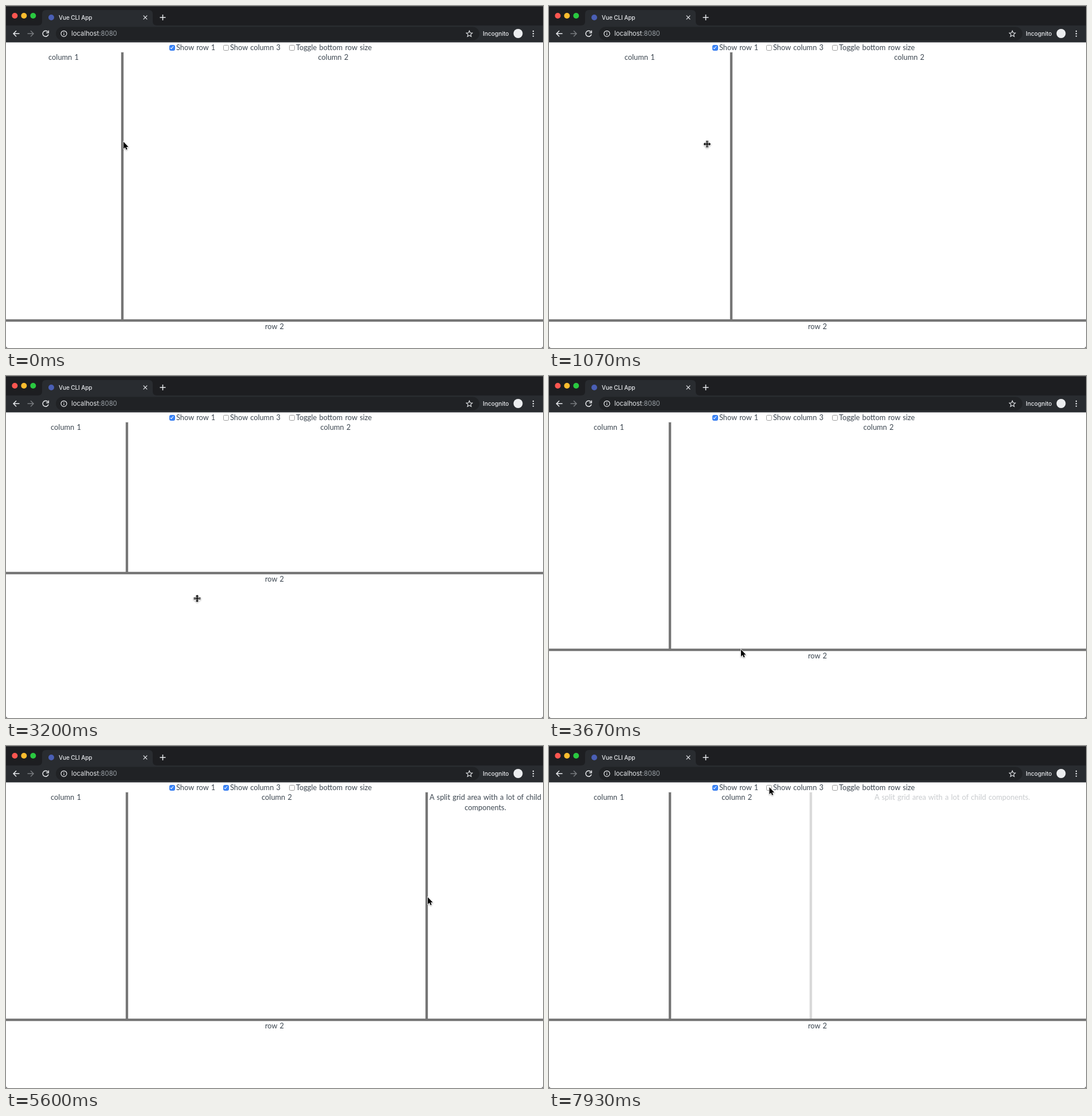
Write an HTML page that moves like this. It is 937 by 597 pixels and loops after 8 s.

```html
<!DOCTYPE html>
<html lang="en">
<head>
<meta charset="utf-8">
<title>Split grid demo</title>
<style>
html, body { margin: 0; width: 100%; height: 100%; overflow: hidden; background: #555; }
#page {
  position: absolute; inset: 0; overflow: hidden; background: #fff; border-radius: 0 0 4px 4px;
  font: 12.8px/17.6px Lato, sans-serif; word-spacing: 1px; color: #3c4650;
  -webkit-font-smoothing: antialiased;
}
#page > *, svg { position: absolute; }
.pane { text-align: center; top: 81px; }
.bar { background: #767676; box-shadow: 0 0 0 1px #76767626; }
.v { width: 4px; top: 81px; }
label { top: 63.5px; white-space: nowrap; }
.box {
  width: 10px; height: 10px; top: 68px; box-sizing: border-box;
  border: 1px solid #9c9c9c; border-radius: 2.5px; background: #fff;
}
.box.on { border-color: #3078ee; background: #3b84f7; }
.box.on::after {
  content: ""; position: absolute; left: 2.4px; top: .2px; width: 2px; height: 4.6px;
  border: solid #fff; border-width: 0 1.4px 1.4px 0; transform: rotate(40deg);
}
svg { left: 0; top: 0; }
svg text { font-family: Inter, sans-serif; }
</style>
</head>
<body>
<div id="page">
  <div class="box on" style="left:285px"></div><label style="left:297px">Show row 1</label>
  <div class="box" id="check" style="left:379px"></div><label style="left:391px">Show column 3</label>
  <div class="box" style="left:494px"></div><label style="left:506px">Toggle bottom row size</label>
  <div class="pane" id="col1" style="left:0">column 1</div>
  <div class="bar v" id="bar1"></div>
  <div class="pane" id="col2">column 2</div>
  <div class="bar v" id="bar2"></div>
  <div class="pane" id="col3">A split grid area with a lot of child components.</div>
  <div class="bar" id="rowBar" style="left:0;width:937px;height:4px"></div>
  <div class="pane" id="row2" style="left:0;width:937px">row 2</div>
</div>
<svg width="937" height="597" fill="none">
  <path fill="#1d1e21" d="M0 0H937V34H0z"/>
  <path fill="#4b4c4e" d="M0 0H937V1H0z"/>
  <path fill="#292c30" d="M0 34H56Q63 34 63 27V14Q63 7 70 7H249Q256 7 256 14V27Q256 34 263 34H937V63.5H0z"/>
  <rect x="87" y="36.5" width="739" height="23.5" rx="11.7" fill="#202225"/>
  <circle cx="15.3" cy="17" r="5" fill="#fc5650"/>
  <circle cx="31.3" cy="17" r="5" fill="#fdbc2e"/>
  <circle cx="47.3" cy="17" r="5" fill="#2ac840"/>
  <circle cx="79" cy="20" r="5" fill="#4a5fb4"/>
  <circle cx="893.5" cy="48" r="8" fill="#eceef0"/>
  <g stroke="#e8eaed" stroke-width="1.5">
    <path stroke-width="1.2" d="M239.7 16.7l6.6 6.6m0-6.6l-6.6 6.6"/>
    <path d="M268.5 20h10m-5-5v10"/>
    <path d="M23.5 48.3H13m5-5l-5 5l5 5"/>
    <path stroke="#777a7e" d="M37.5 48.3H48m-5-5l5 5l-5 5"/>
    <path d="M73 45A5 5 0 1 0 74 49.5M74.3 42.7V46.7H70.3"/>
    <circle cx="101" cy="48.3" r="5" stroke-width="1.2"/>
    <path stroke-width="1.2" d="M101 47.5v3.5m0-6v1.3"/>
    <path stroke-width="1.1" d="M808.5 43.2l1.5 3.5l3.8.4l-2.9 2.5l.9 3.7l-3.3-2l-3.3 2l.9-3.7l-2.9-2.5l3.8-.4z"/>
  </g>
  <g fill="#e8eaed">
    <circle cx="920" cy="44" r="1.2"/><circle cx="920" cy="48.3" r="1.2"/><circle cx="920" cy="52.6" r="1.2"/>
    <text x="92" y="23.6" font-size="10" font-weight="500" letter-spacing="-.1">Vue CLI App</text>
    <text x="114" y="52.3" font-size="11.3">localhost<tspan fill="#9aa0a6">:8080</tspan></text>
    <text x="832" y="52" font-size="10.2" font-weight="500">Incognito</text>
  </g>
  <g id="pointer" style="filter:drop-shadow(0 1px 1px #0005)">
    <path id="arrow" fill="#000" stroke="#fff" stroke-width="1.4" paint-order="stroke"
      d="M0 0V12.2L2.8 9.6L4.7 13.8L6.7 12.9L4.9 8.9H8.6z"/>
    <path id="resize" fill="#000" stroke="#fff" stroke-width="1.4" paint-order="stroke"
      d="M-6.3 0L-3.3-3V-.8H-1.7V-6H-.4V-.8H.4V-6H1.7V-.8H3.3V-3L6.3 0L3.3 3V.8H1.7V6H.4V.8H-.4V6H-1.7V.8H-3.3V3z"/>
  </g>
</svg>
<script>
const TICK = 200 / 3, LOOP = 8000, WIDTH = 937;
const $ = id => document.getElementById(id);
const within = (k, from, to) => k >= from && k < to;
const easeOut = u => 1 - (1 - Math.min(1, Math.max(0, u))) ** 2;

// Pointer moves: start tick, end tick, target x, target y
const moves = [
  [0, 1, 203, 241],
  [6, 11, 594, 241], [11, 19.5, 211, 241],      // drag the first column
  [21, 24, 314, 533], [26, 28, 316, 549],
  [39, 45, 331, 230], [45, 52.5, 335, 477.5],   // drag the row
  [55, 60, 408, 220], [60, 66, 382, 69],        // tick the checkbox
  [70, 80, 736, 264], [89, 90, 737, 271],
  [95, 101, 444.5, 247],                        // drag the third column
  [104, 117, 384.5, 72]                         // untick the checkbox
];

function pointerAt(k) {
  let x = 205, y = 237;
  for (const [from, to, tx, ty] of moves) {
    const u = easeOut((k - from) / (to - from));
    x += (tx - x) * u;
    y += (ty - y) * u;
  }
  return [x, y];
}

// A dragged bar trails the pointer by one tick
const dragged = (k, from, to, rest, axis) =>
  k <= from + 1 ? rest : pointerAt(Math.min(k - 1, to))[axis];

function place(id, styles) {
  for (const key in styles) {
    const v = styles[key];
    $(id).style[key] = typeof v === "number" && key !== "opacity" ? v + "px" : v;
  }
}

function draw(k) {
  const x1 = dragged(k, 6, 19.5, 203, 0);
  const x2 = dragged(k, 95, 101, 734, 0);
  const y = dragged(k, 39, 52.5, 549, 1);
  const shown = k >= 68, height = y - 83;
  const opacity = easeOut((k - 67) / 4) - .36 * Math.max(0, k - 117);
  const transform = `translateX(${16.5 * (1 - opacity)}px)`;

  place("col1", { width: x1 - 2 });
  place("bar1", { left: x1 - 2, height });
  place("col2", { left: x1 + 2, width: (shown ? x2 - 2 : WIDTH) - x1 - 2 });
  place("bar2", { left: x2 - 2, height, opacity, transform });
  place("col3", { left: x2 + 2, width: WIDTH - x2 - 2, opacity, transform });
  place("rowBar", { top: y - 2 });
  place("row2", { top: y + 2 });
  $("check").classList.toggle("on", within(k, 68, 118));

  const vertical = within(k, 27, 55);
  const resizing = vertical || within(k, 1, 22) || within(k, 90, 105);
  const [px, py] = pointerAt(k);
  $("pointer").setAttribute("transform", `translate(${px} ${py})`);
  $("arrow").style.display = resizing ? "none" : "";
  $("resize").style.display = resizing ? "" : "none";
  $("resize").setAttribute("transform", vertical ? "rotate(90)" : "");
}

const start = performance.now();
function frame() {
  const t = (performance.now() - start) % LOOP;
  draw(Math.min(119, Math.floor((t + 4) / TICK)));
  requestAnimationFrame(frame);
}
frame();
</script>
</body>
</html>
```
